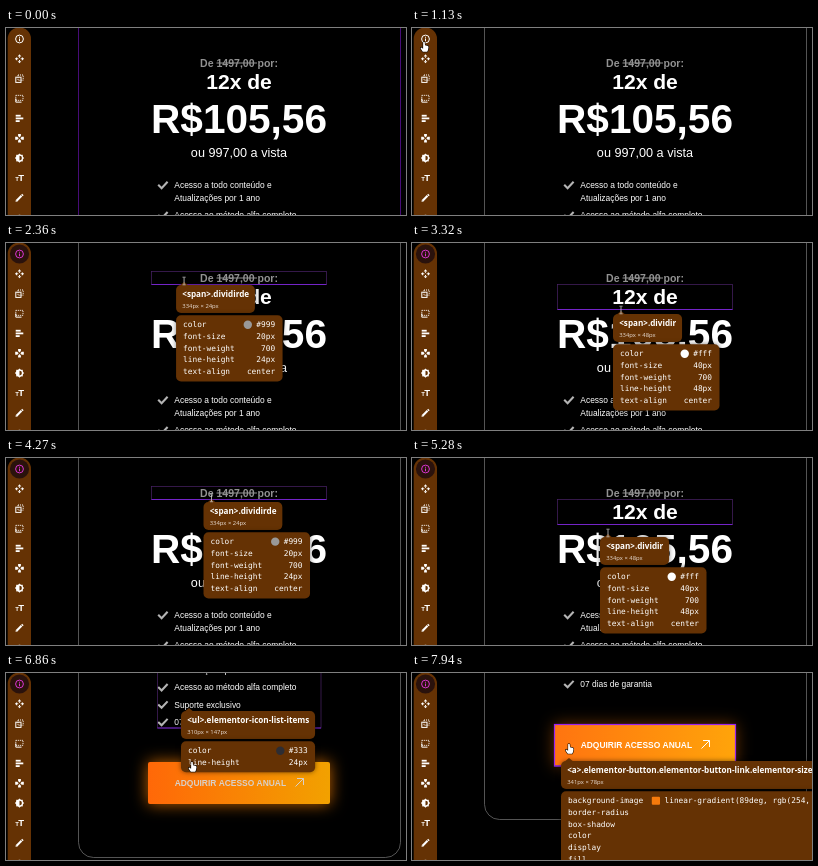
These frames come from a looping animation (400 px wide and 187 px high, 8 s). An HTML page with a canvas:

```html
<!DOCTYPE html>
<html lang="pt">
<head>
<meta charset="utf-8">
<title>Inspecionar</title>
<style>
html, body { margin: 0; width: 100%; height: 100%; overflow: hidden; background: #000; }
canvas { display: block; width: 100vw; height: 100vh; }
</style>
</head>
<body>
<canvas></canvas>
<script>
const W = 400, H = 187, LOOP = 8000;
const SANS = '"Liberation Sans", Arial, sans-serif';
const UI = '"Open Sans", "Noto Sans", sans-serif';
const MONO = '"DejaVu Sans Mono", monospace';
const BROWN = '#653204', PURPLE = '#7424c8';
const canvas = document.querySelector('canvas');
const c = canvas.getContext('2d');
let scale = 1;

// Bursts of motion: start, end, number of steps
const bursts = [
  [390, 800, 7], [1060, 1130, 2], [1390, 1390, 1], [1530, 1600, 2],
  [1750, 2430, 11], [2960, 3320, 6], [3850, 4340, 8], [5070, 5630, 9],
  [6160, 6930, 12], [7000, 7800, 12], [7870, 7940, 2]
];

// Keys: time, then values
const pointer = [
  [390, 70, 60], [800, 16, 24], [1060, 14, 20], [1130, 12, 14], [1390, 11, 8],
  [1700, 11, 8], [1960, 53, 38], [2430, 229, 38], [2900, 229, 38], [3320, 209, 67],
  [3790, 209, 67], [4340, 205, 36], [5000, 205, 36], [5280, 196, 75], [5630, 179, 93],
  [6090, 179, 93], [6300, 182, 80], [6860, 186, 89], [6930, 186, 89],
  [7800, 158, 75], [7940, 157, 71]
];
const scrolling = [
  [6090, 0], [6160, 22], [6300, 80], [6450, 118], [6650, 148],
  [6860, 173], [6930, 185], [7070, 205], [7210, 211]
];
const helpFade = [[1680, 0], [1820, .42], [1960, .2], [2100, 0]];

const span = (size, line, color) => [
  ['color', color, color], ['font-size', size], ['font-weight', '700'],
  ['line-height', line], ['text-align', 'center']
];
const big = span('77px', '92.4px', '#fff');
big.splice(1, 0, ['display', 'inline']);

const targets = {
  top: { name: '<span>.dividirde', size: '334px × 24px', box: [145.5, 28.5, 175, 13], rows: span('20px', '24px', '#999') },
  mid: { name: '<span>.dividir', size: '334px × 48px', box: [145.5, 41.5, 175, 25], rows: span('40px', '48px', '#fff') },
  big: { name: '<span>.dividirvalor', size: '334px × 86px', box: [145.5, 68.5, 175, 44.5], rows: big },
  list: {
    name: '<ul>.elementor-icon-list-items', size: '310px × 147px', box: [151.5, 150.5, 163.5, 77.5],
    rows: [['color', '#333', '#2d2d33'], ['line-height', '24px']]
  },
  link: {
    name: '<a>.elementor-button.elementor-button-link.elementor-size-sm', size: '341px × 78px',
    box: [142.5, 262.5, 181, 41.5], dy: 17, width: 330,
    rows: [
      ['background-image', 'linear-gradient(89deg, rgb(254, 110, 0) 0%, rgb(255, 165, 0) 100%)', '#f57a0c'],
      ['border-radius', '3px'], ['box-shadow', '0 0 20px'], ['color', '#fff'],
      ['display', 'inline-block'], ['fill', '#fff']
    ]
  }
};

// Start, target, optional fixed place on the page
const hovers = [
  [0], [2240, 'top'], [3040, 'mid'], [4060, 'top'], [5140, 'mid'],
  [5420, 'big'], [5630, 'big', 171, 97], [6375, 'list', 175, 211], [7070, 'link']
];

function snap(t) {
  let out = 0;
  for (const [a, b, n] of bursts) {
    if (t < a) break;
    const gap = n > 1 ? (b - a) / (n - 1) : 0;
    out = t >= b ? b : a + Math.floor((t - a) / gap + .01) * gap;
  }
  return out;
}

function at(keys, t) {
  const i = keys.findIndex(k => k[0] > t);
  if (i === 0) return keys[0].slice(1);
  if (i < 0) return keys[keys.length - 1].slice(1);
  const a = keys[i - 1], b = keys[i], p = (t - a[0]) / (b[0] - a[0]);
  return a.slice(1).map((v, j) => v + (b[j + 1] - v) * p);
}

function text(s, x, y, font, color = '#fff', align = 'left') {
  c.font = font;
  c.fillStyle = color;
  c.textAlign = align;
  c.fillText(s, x, y);
}

function rect(x, y, w, h, r, fill) {
  c.beginPath();
  c.roundRect(x, y, w, h, r);
  c.fillStyle = fill;
  c.fill();
}

function disc(x, y, r, fill) {
  c.beginPath();
  c.arc(x, y, r, 0, 7);
  c.fillStyle = fill;
  c.fill();
}

function path(points, close) {
  c.beginPath();
  for (let i = 0; i < points.length; i += 2) c.lineTo(points[i], points[i + 1]);
  if (close) c.closePath();
}

function line(points, color, width = 1) {
  path(points);
  c.strokeStyle = color;
  c.lineWidth = width;
  c.stroke();
}

function poly(points, fill) {
  path(points, true);
  c.fillStyle = fill;
  c.fill();
}

function at0(x, y, draw) {
  c.save();
  c.translate(x, y);
  draw();
  c.restore();
}

function cardEdge(color) {
  c.beginPath();
  c.roundRect(72.5, -60, 322, 417.5, 15);
  c.strokeStyle = color;
  c.lineWidth = .8;
  c.stroke();
}

function button(t) {
  const over = t >= 6700 && t < 7000;
  const g = c.createLinearGradient(142, 0, 324, 0);
  g.addColorStop(0, over ? '#ff6808' : '#ff7410');
  g.addColorStop(1, over ? '#f2a100' : '#ffa40a');
  c.save();
  c.shadowColor = over ? 'rgba(255,130,0,.75)' : 'rgba(255,120,0,.4)';
  c.shadowBlur = 16 * scale;
  rect(142, 262, 182, 42, 2, g);
  c.restore();
  const ink = over ? '#d8d0c8' : '#fff';
  text('ADQUIRIR ACESSO ANUAL', 168.7, 286, `bold 8.43px ${SANS}`, ink);
  line([289.5, 286.5, 297.5, 278.5], ink);
  line([291, 278.5, 297.5, 278.5, 297.5, 285], ink);
}

function page(t) {
  cardEdge(t < 460 || (t > 2080 && t < 2240) ? '#5a1096' : '#6a6a6a');
  text('De 1497,00 por:', 233, 38.5, `bold 10.54px ${SANS}`, '#929292', 'center');
  line([210.5, 35, 251, 35], '#929292');
  text('12x de', 233, 61.3, `bold 21.08px ${SANS}`, '#fff', 'center');
  text('R$105,56', 233, 105.3, `bold 40.57px ${SANS}`, '#fff', 'center');
  text('ou 997,00 a vista', 233, 129.3, `12.65px ${SANS}`, '#fff', 'center');
  [
    ['Acesso a todo conteúdo e', 160], ['Atualizações por 1 ano', 172.7],
    ['Acesso ao método alfa completo', 190.2], ['Suporte exclusivo', 207.6],
    ['07 dias de garantia', 225.1]
  ].forEach(([s, y], i) => {
    text(s, 168.3, y, `8.43px ${SANS}`);
    if (i !== 1) line([152.2, y - 3.2, 155.6, y + .2, 161.6, y - 6.2], '#b4b4b4', 2.1);
  });
  button(t);
}

function outline([x, y, w, h], strong) {
  c.strokeStyle = strong ? '#9a22ee' : '#4b2368';
  c.lineWidth = strong ? 1.2 : .7;
  c.strokeRect(x, y, w, h);
  line([x, y + h, x + w, y + h], PURPLE);
}

const icons = [
  col => {
    c.beginPath();
    c.arc(0, 0, 3.9, 0, 7);
    c.strokeStyle = col;
    c.lineWidth = 1;
    c.stroke();
    rect(-.5, -2.2, 1, 1, 0, col);
    rect(-.5, -.5, 1, 2.8, 0, col);
  },
  col => around(() => {
    poly([0, -4.5, 1.8, -2.4, -1.8, -2.4], col);
    rect(-.5, -2.4, 1, 1.2, 0, col);
  }),
  col => {
    c.strokeStyle = col;
    c.lineWidth = 1;
    c.strokeRect(-3.7, -1.5, 5.2, 5.2);
    dashed(-1.5, -3.7, 5.2, 5.2);
  },
  col => {
    c.strokeStyle = col;
    c.lineWidth = 1;
    dashed(-3.7, -3.2, 7.2, 5);
    line([-3.7, 3.6, 2, 3.6], col);
    line([-3.7, 0, -3.7, 3.6], col);
  },
  col => [5, 7.6, 4].forEach((w, i) => rect(-3.8, -3.6 + i * 2.7, w, 1.8, 0, col)),
  col => around(() => poly([-1.4, -4.3, 1.4, -4.3, 1.4, -2.2, 0, -.8, -1.4, -2.2], col)),
  col => {
    poly([0, -4.6, 4.6, 0, 0, 4.6, -4.6, 0], col);
    rect(-3.3, -3.3, 6.6, 6.6, 0, col);
    c.beginPath();
    c.arc(0, 0, 2.4, -Math.PI / 2, Math.PI / 2);
    c.fillStyle = BROWN;
    c.fill();
  },
  col => {
    text('T', 1.6, 3.4, `bold 9.5px ${SANS}`, col, 'center');
    text('T', -2.5, 3.4, `bold 6px ${SANS}`, col, 'center');
  },
  col => {
    line([-2.9, 2.9, 2, -2], col, 2.1);
    line([2.4, -2.4, 3.4, -3.4], col, 2.1);
    poly([-4, 4, -3.6, 1.9, -1.9, 3.6], col);
  },
  col => disc(0, -1, 2, col)
];

function around(draw) {
  for (let i = 0; i < 4; i++) {
    draw();
    c.rotate(Math.PI / 2);
  }
}

function dashed(x, y, w, h) {
  c.setLineDash([1, 1]);
  c.strokeRect(x, y, w, h);
  c.setLineDash([]);
}

function toolbar(t) {
  rect(1.7, -.5, 23.3, 220, 11.5, BROWN);
  const active = t >= 1530;
  if (active) disc(13.5, 11, 9.6, '#2a120c');
  icons.forEach((draw, i) =>
    at0(13.5, 11 + i * 19.85, () => draw(active && !i ? '#d834d0' : '#fff')));
}

function helpPanel(alpha) {
  if (!alpha) return;
  c.save();
  c.globalAlpha = alpha;
  rect(23, 0, 190, 187, 0, '#1c1c1c');
  rect(23, -10, 163, 119, 4, '#4a4a4a');
  rect(80, 7, 86, 76, 2, '#6c6c6c');
  disc(87, 14, 4, '#b08a70');
  rect(93, 12, 27, 2, 0, '#aaa');
  rect(93, 16, 18, 1.5, 0, '#888');
  rect(80, 22, 86, 40, 0, '#7c6858');
  rect(57, 44, 59, 37, 2, '#b8b8b8');
  rect(60, 48, 26, 2, 0, '#555');
  for (let i = 0; i < 4; i++) {
    rect(60, 55 + i * 6, 20, 1.5, 0, '#666');
    rect(97, 55 + i * 6, 15, 1.5, 0, '#666');
  }
  text('Inspecionar', 31, 129.5, `bold 12.4px ${UI}`);
  rect(31, 131, 4, 1, 0, '#e63cc8');
  const small = `8.3px ${UI}`;
  text('Inspeccione os estilos comuns de um', 31, 149, small, '#ddd');
  text('elemento', 31, 161.5, small, '#ddd');
  text('Fixar:', 31, 183, `bold 8.3px ${UI}`);
  text('clique', 206, 183, small, '#ddd', 'right');
  c.restore();
}

function swatch(x, y, color) {
  if (color === '#f57a0c') rect(x - 4.2, y - 4, 8.2, 8, 1, color);
  else disc(x, y, 4.2, color);
}

function tip(target, x, y) {
  const { name, size, rows } = target;
  const nameFont = `bold 8.15px ${UI}`, rowFont = `7.8px ${MONO}`;
  c.font = nameFont;
  const head = c.measureText(name).width + 12;
  const body = Math.max(106.5, target.width || head);
  c.save();
  c.shadowColor = 'rgba(0,0,0,.5)';
  c.shadowBlur = 5 * scale;
  rect(x, y, head, 28, 5, BROWN);
  rect(x, y + 30.3, body, rows.length * 11.75 + 7.5, 5, BROWN);
  c.restore();
  poly([x + 4, y + .2, x + 8, y - 3, x + 12, y + .2], BROWN);
  text(name, x + 6.2, y + 12, nameFont);
  text(size, x + 6.2, y + 23.3, `5.9px ${UI}`, '#eadfd6');
  rows.forEach(([key, value, color], i) => {
    const mid = y + 39.7 + i * 11.7;
    text(key, x + 7, mid + 2.6, rowFont);
    if (target.width && !i) {
      text(value, x + 103.5, mid + 2.6, rowFont);
      swatch(x + 95, mid, color);
      return;
    }
    text(value, x + body - 7.5, mid + 2.6, rowFont, '#fff', 'right');
    if (color) swatch(x + body - 7.5 - c.measureText(value).width - 8.5, mid, color);
  });
}

const cursors = {
  arrow() {
    path([0, 0, 0, 7.4, 1.8, 5.8, 3, 8.4, 4.1, 7.9, 3, 5.4, 5.3, 5.2], true);
    ink();
  },
  hand() {
    path([-.8, 0, .7, 0, 1, 3.2, 4, 4, 4.5, 5, 4, 8, 3.2, 9.8, -1.2, 9.8, -3.4, 6.4, -2.8, 5.4, -.9, 6.8], true);
    ink();
  },
  beam() {
    line([0, -3.5, 0, 3.5], '#d0d0d0', .8);
    line([-1.6, -3.8, 1.6, -3.8], '#d0d0d0', .7);
    line([-1.6, 3.8, 1.6, 3.8], '#d0d0d0', .7);
  }
};

function ink() {
  c.lineJoin = 'round';
  c.strokeStyle = '#000';
  c.lineWidth = 1.1;
  c.stroke();
  c.fillStyle = '#fff';
  c.fill();
  c.lineJoin = 'miter';
}

function cursorKind(t) {
  if (t < 1060) return 'arrow';
  if (t < 1740) return 'hand';
  if (t < 2240) return 'arrow';
  return t < 6160 ? 'beam' : 'hand';
}

function draw(now) {
  const t = snap(now);
  const [scroll] = at(scrolling, t);
  const [px, py] = at(pointer, t);
  const [, key, fixX, fixY] = hovers.filter(h => h[0] <= t).pop();
  const target = targets[key];

  c.fillStyle = '#000';
  c.fillRect(0, 0, W, H);
  at0(0, -scroll, () => {
    page(t);
    if (target) outline(target.box, key === 'link');
  });
  helpPanel(at(helpFade, t)[0]);
  toolbar(t);
  if (target) {
    if (fixX) tip(target, fixX, fixY - scroll);
    else tip(target, px - 8, py + (target.dy || 4));
  }
  if (t >= 390) at0(px, py, cursors[cursorKind(t)]);
}

function resize() {
  const dpr = window.devicePixelRatio || 1;
  canvas.width = Math.round(innerWidth * dpr);
  canvas.height = Math.round(innerHeight * dpr);
  scale = canvas.width / W;
  c.setTransform(scale, 0, 0, canvas.height / H, 0, 0);
}

addEventListener('resize', resize);
resize();
const start = performance.now();
function loop() {
  draw((performance.now() - start) % LOOP);
  requestAnimationFrame(loop);
}
loop();
</script>
</body>
</html>
```
